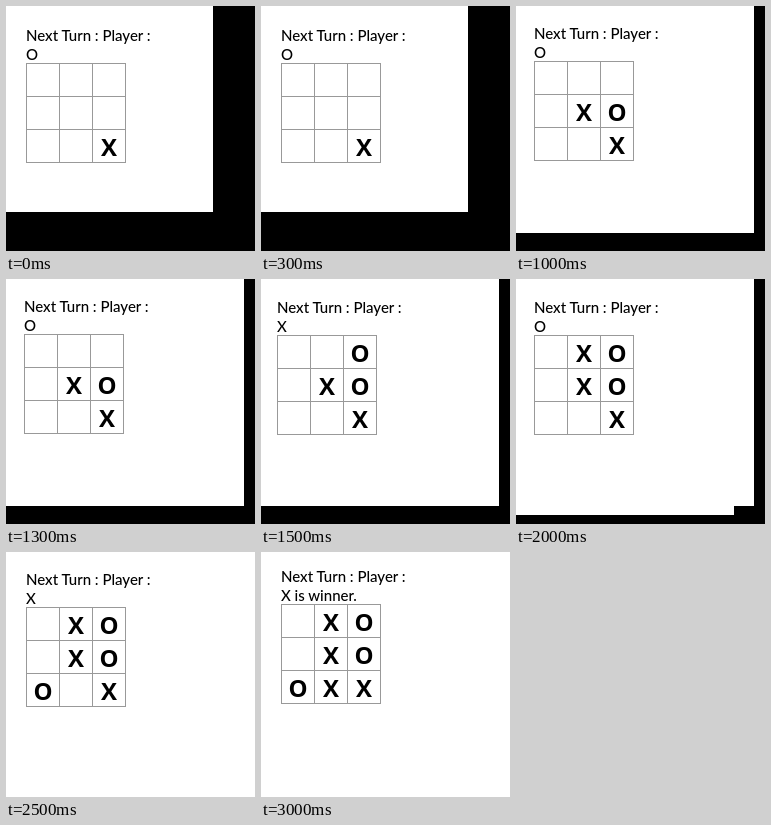
These frames come from a looping animation (249 px wide and 245 px high, 3.5 s). An HTML page:

```html
<!DOCTYPE html>
<html lang="en">
<head>
<meta charset="utf-8">
<style>
  html, body { margin: 0; width: 100%; height: 100%; overflow: hidden; background: #000; }
  svg { display: block; }
  .status { font: 500 15px Lato, sans-serif; }
  .mark { font: bold 24px "Open Sans", sans-serif; text-anchor: middle; }
</style>
</head>
<body>
<svg width="249" height="245" viewBox="0 0 249 245">
  <path id="page" fill="#fff"/>
  <g id="game">
    <text class="status" y="-22">Next Turn : Player :</text>
    <text class="status" id="status" y="-3.5"></text>
    <path fill="none" stroke="#999" d="M0 .5H100M0 33.5H100M0 66.5H100M0 99.5H100M.5 0V100M33.5 0V100M66.5 0V100M99.5 0V100"/>
  </g>
</svg>
<script>
const STEP = 500, CELL = 33;
const moves = [8, 5, 4, 2, 1, 6, 7]; // cell index of each turn, X first
const origins = [[20, 57], [20, 55], [18, 55], [16, 56], [18, 56], [20, 55], [20, 52]];
const small = "M0 0H207V206H0Z", medium = "M0 0H238V227H0Z";
const stepped = "M0 0H238V227H218V236H0Z", full = "M0 0H249V245H0Z";
const pages = [small, medium, medium, medium, stepped, full, full];

const get = id => document.getElementById(id);
const page = get("page"), game = get("game"), status_ = get("status");
const player = turn => turn % 2 ? "O" : "X";

const marks = moves.map((cell, turn) => {
  const mark = document.createElementNS("http://www.w3.org/2000/svg", "text");
  mark.setAttribute("class", "mark");
  mark.setAttribute("x", cell % 3 * CELL + 17);
  mark.setAttribute("y", Math.floor(cell / 3) * CELL + 27);
  mark.textContent = player(turn);
  return game.appendChild(mark);
});

let shown = -1;
function draw() {
  const turn = Math.floor(performance.now() / STEP) % moves.length;
  if (turn !== shown) {
    shown = turn;
    page.setAttribute("d", pages[turn]);
    game.setAttribute("transform", `translate(${origins[turn]})`);
    status_.textContent = turn === moves.length - 1 ? "X is winner." : player(turn + 1);
    marks.forEach((mark, i) => mark.setAttribute("visibility", i <= turn ? "visible" : "hidden"));
  }
  requestAnimationFrame(draw);
}
draw();
</script>
</body>
</html>
```
